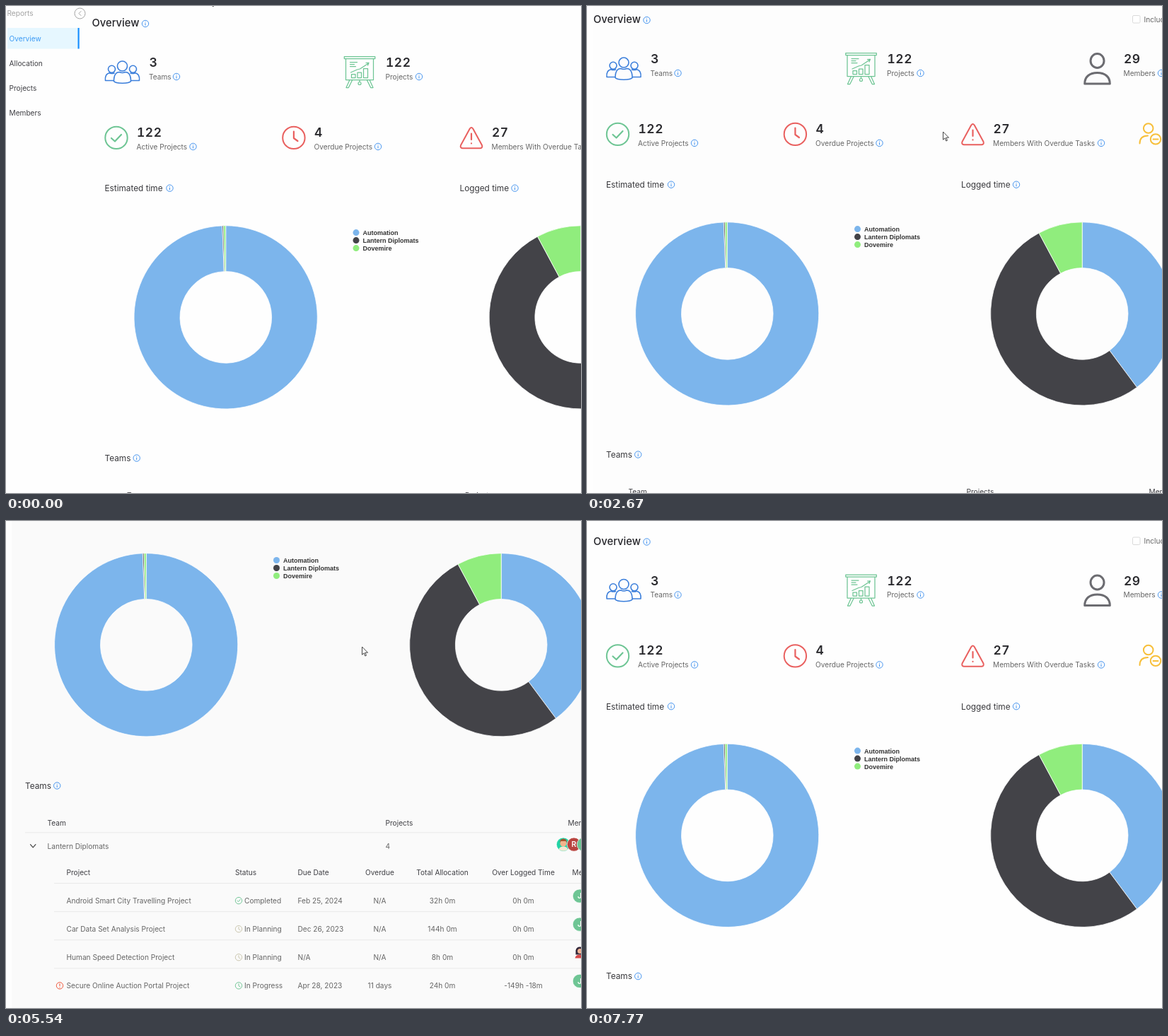
Recreate the animation shown at these times as an HTML page. Size 813 px wide and 689 px high, loop 8000 ms.

```html
<!DOCTYPE html>
<html lang="en">
<head>
<meta charset="utf-8">
<title>Reports overview</title>
<style>
  html, body { margin: 0; width: 100%; height: 100%; overflow: hidden; background: #fefefe; }
  svg { display: block; width: 813px; height: 689px; }
  text { font: 10.15px Inter, sans-serif; fill: #666; }
  .title { font-size: 14.75px; font-weight: 500; fill: #26262b; }
  .head { font-size: 11.8px; fill: #38383c; }
  .num { font-size: 17.4px; font-weight: 600; letter-spacing: .6px; font-variant-numeric: tabular-nums; fill: #2a2a2e; }
  .th { fill: #3f3f44; }
  .mid { text-anchor: middle; }
  .key { font: bold 9px "Liberation Sans", Arial, sans-serif; fill: #333; }
  .muted { fill: #a3a3a3; }
  .on { fill: #3d9bf5; }
  .initial { font-size: 10.5px; font-weight: 600; fill: #fff; text-anchor: middle; }
  .line { fill: none; stroke-linecap: round; stroke-linejoin: round; }
</style>
</head>
<body>
<svg id="stage" viewBox="0 0 813 689">
  <g id="page">
    <rect id="back" x="8" y="-800" width="1000" height="2400"/>
    <g id="side" transform="translate(-112.5 -5)"></g>
    <g id="main"></g>
    <g id="table" transform="translate(0 260.7)"></g>
  </g>
  <path id="cursor" d="M0 0V11.2L2.6 8.8 4.3 13 6 12.2 4.2 8.2H8Z" fill="#fff" stroke="#333" stroke-width=".9"/>
</svg>
<script>
const $ = id => document.getElementById(id);
const BLUE = '#7cb5ec', DARK = '#434348', LIME = '#90ed7d';
const GREEN = '#6ec594', RED = '#e9605f', LINK = '#3d8fee', SAND = '#c8c3aa';
const AZURE = '#3c7fdb', GREY = '#6c6c71', AMBER = '#f7bf3a';

const text = (x, y, s, cls = '') => `<text x="${x}" y="${y}" class="${cls}">${s}</text>`;
const line = (d, color, w) => `<path class="line" d="${d}" stroke="${color}" stroke-width="${w}"/>`;
const disc = (x, y, r, fill) => `<circle cx="${x}" cy="${y}" r="${r}" fill="${fill}"/>`;
const ring = (x, y, r, color, w) =>
  `<circle cx="${x}" cy="${y}" r="${r}" fill="none" stroke="${color}" stroke-width="${w}"/>`;
const rule = (x, y) => `<path d="M${x} ${y}H900" stroke="#e9e9e9"/>`;

const info = (x, y) => ring(x, y, 4.7, LINK, .95) +
  line(`M${x} ${y - .4}v2.6M${x} ${y - 2.3}v.1`, LINK, 1);
const stat = (x, y, num, label, infoX) =>
  text(x + .5, y, num, 'num') + text(x, y + 17.7, label) + info(infoX, y + 14);
const check = (x, y) => ring(x, y, 4.7, GREEN, .95) + line(`M${x - 2} ${y}l1.5 1.6 2.7-3.2`, GREEN, .95);
const clock = (x, y, color) => ring(x, y, 4.7, color, .95) + line(`M${x} ${y - 2.6}v2.9l2 1.2`, color, .95);

const OUTER = 129.6, INNER = 64.8;
function slice(cx, cy, a, b, fill) {
  const at = (r, f) => {
    const q = f * 2 * Math.PI;
    return `${(cx + r * Math.sin(q)).toFixed(2)} ${(cy - r * Math.cos(q)).toFixed(2)}`;
  };
  const big = b - a > .5 ? 1 : 0;
  return `<path d="M${at(OUTER, a)}A${OUTER} ${OUTER} 0 ${big} 1 ${at(OUTER, b)}L${at(INNER, b)}` +
    `A${INNER} ${INNER} 0 ${big} 0 ${at(INNER, a)}Z" fill="${fill}" stroke="#fff" stroke-width=".75"/>`;
}
const donut = (cx, a, b) => slice(cx, 435.4, 0, a, BLUE) +
  slice(cx, 435.4, a, b, DARK) + slice(cx, 435.4, b, 1, LIME);

function badge(x, y, color, letter = '') {
  return `<circle cx="${x}" cy="${y}" r="9.7" fill="${color}" stroke="#fff" stroke-width=".7"/>` +
    text(x, y + 3.8, letter, 'initial');
}

$('side').innerHTML =
  text(1.5, 14, 'Reports', 'muted') +
  ring(104.5, 10.5, 7.5, '#a3a3a3', 1) + line('M106 7.5l-3 3 3 3', '#a3a3a3', 1) +
  '<path d="M2 31H103V60.5H2Z" fill="#e6f7ff"/><path d="M101.5 31h2.2v29.5h-2.2Z" fill="#1890ff"/>' +
  text(4.5, 49.8, 'Overview', 'on') +
  ['Allocation', 'Projects', 'Members'].map((s, i) => text(4.5, 84.7 + 35 * i, s, 'th')).join('');

const teamIcon = ring(52, 80, 7, AZURE, 1.6) + ring(37, 84.3, 5, AZURE, 1.6) + ring(67, 84.3, 5, AZURE, 1.6) +
  line('M40 101.5c0-9 3.5-13 8-13q4 2 8 0c4.5 0 8 4 8 13q-2 2.7-12 2.7t-12-2.7Z' +
    'M39.5 100.5H28c-.8-6 1.5-10.3 6-10.8q3 1.5 6.5.3M64.5 100.5H76c.8-6-1.5-10.3-6-10.8q-3 1.5-6.5.3', AZURE, 1.6);
const boardIcon = line('M365.8 66.5h43.5v3h-43.5ZM368 69.5V99.5h39V69.5M373.5 99.5l-5 11h3.3l5.5-11M401.5 99.5l5 11h-3.3l-5.5-11' +
  'M387.5 99.5v3M374 74.5h10M374 77.5h6M374 80.5h8M375 89l9-4 4-1 12-8M396.5 75.5l4-.2-1.5 3.7' +
  'M376 91.5h5.5v5h-5.5ZM384.5 89h5.5v7.5h-5.5ZM393 83.5h6v13h-6Z', GREEN, 1.25) + ring(387.5, 104.5, 2, GREEN, 1.2);
const memberIcon = `<ellipse cx="721.5" cy="77.5" rx="9.5" ry="10" fill="none" stroke="${GREY}" stroke-width="3"/>` +
  line('M703.7 110c0-10 7-15.5 17.8-15.5s17.8 5.5 17.8 15.5Z', GREY, 3);
const alertIcon = line('M543.3 168.5q2.2-3 4.4 0L560.5 192q1.2 3.8-2.5 4.3H533q-3.7-.5-2.5-4.3Z', RED, 2) +
  line('M545.5 175.5v8.5M545.5 189.3v.1', RED, 2.2);
const idleIcon = ring(793.7, 173, 6.8, AMBER, 2) + ring(804, 188.4, 7.2, AMBER, 2) +
  line('M781.5 194.5c0-7 4-11 11.5-11M800.5 188.4h7', AMBER, 2);

$('main').innerHTML =
  text(9, 24, 'Overview', 'title') + info(84.5, 20) +
  '<rect x="771.5" y="13.5" width="10.5" height="10.5" rx="1.5" fill="#fff" stroke="#d6d6d6" stroke-width=".9"/>' +
  text(787.5, 22.7, 'Include Archived Projects') +
  teamIcon + boardIcon + memberIcon +
  stat(89.5, 81, 3, 'Teams', 128.5) + stat(424, 81, 122, 'Projects', 471.5) + stat(758.5, 81, 29, 'Members', 812) +
  ring(43.5, 181.4, 15.7, GREEN, 2) + line('M36.5 182l5 4.5 9-9.5', GREEN, 2.2) +
  ring(294.4, 181.4, 15.7, RED, 2) + line('M294.4 172.5v9.5l5.5 4', RED, 2.2) +
  alertIcon + idleIcon +
  stat(72, 179.9, 122, 'Active Projects', 152) + stat(323, 179.9, 4, 'Overdue Projects', 413.5) +
  stat(574, 179.9, 27, 'Members With Overdue Tasks', 727) +
  text(27, 257, 'Estimated time', 'head') + info(119, 252.7) +
  text(529, 257, 'Logged time', 'head') + info(607, 252.7) +
  donut(198.2, .994, .9963) + donut(700.2, .3983, .9218) +
  [['Automation', BLUE], ['Lantern Diplomats', DARK], ['Dovemire', LIME]].map(([s, c], i) =>
    disc(382.5, 315.6 + 11 * i, 4.5, c) + text(392, 319 + 11 * i, s, 'key')).join('') +
  text(27, 638.7, 'Teams', 'head') + info(72.2, 634.6);

const rows = [
  ['Android Smart City Travelling Project', 'Completed', 'Feb 25, 2024', 'N/A', '32h 0m', '0h 0m'],
  ['Car Data Set Analysis Project', 'In Planning', 'Dec 26, 2023', 'N/A', '144h 0m', '0h 0m'],
  ['Human Speed Detection Project', 'In Planning', 'N/A', 'N/A', '8h 0m', '0h 0m'],
  ['Secure Online Auction Portal Project', 'In Progress', 'Apr 28, 2023', '11 days', '24h 0m', '-149h -18m']
];
const cells = (r, y, cls, statusX) => [85.5, statusX, 412.5, 528.5, 617, 731.5]
  .map((x, i) => text(x, y, r[i], cls + (i > 2 ? ' mid' : ''))).join('');
const statusIcon = {
  'Completed': check,
  'In Planning': (x, y) => clock(x, y, SAND),
  'In Progress': (x, y) => clock(x, y, GREEN)
};

$('table').innerHTML =
  text(58.5, 430, 'Team', 'th') + text(536.5, 430, 'Projects', 'th') + text(794.5, 430, 'Members', 'th') +
  rule(27, 440.3) + line('M34.5 457l3.7 4.2 3.7-4.2', '#444', 1.2) +
  text(58.5, 463, 'Lantern Diplomats') + text(536.5, 463, '4') +
  badge(788, 457, '#22d3a5') + disc(788, 455.5, 4.6, '#f3b48c') +
  '<path d="M783 455q0-6 5-6t5 6l-1.5-2.5h-7Z" fill="#a8532d"/><path d="M781.5 464q1.5-4 6.5-4t6.5 4q-6.5 4.5-13 0" fill="#f6e7d2"/>' +
  badge(803, 457, '#b8443f', 'R') + badge(817, 457, GREEN) +
  cells(['Project', 'Status', 'Due Date', 'Overdue', 'Total Allocation', 'Over Logged Time'], 500, 'th', 324) +
  text(800.5, 500, 'Members', 'th') +
  rows.map((r, i) => {
    const y = 536.5 + 40.1 * i;
    return rule(68, y - 24.5) + statusIcon[r[1]](329, y) + cells(r, y + 3.7, '', 337) +
      (i === 2 ? '' : badge(811, y - 6.5, GREEN, 'J'));
  }).join('') +
  '<path d="M805.5 613v-6q1-5 6-5t6 5v6Z" fill="#33283a"/>' + disc(811.5, 608, 3.5, '#f0b394') +
  '<path d="M804.5 618q1-5 7-5t7 5Z" fill="#d84a4a"/>' +
  ring(76, 656.8, 4.7, '#f0583c', 1) + line('M76 654.3v2.7M76 659.2v.1', '#f0583c', 1.1);

// Motion
const clamp = v => Math.min(1, Math.max(0, v));
const sine = p => (1 - Math.cos(Math.PI * clamp(p))) / 2;
const steps = (t, from, step) => Math.floor((t - from) / step + .001);
const TOP = 9.5, BOTTOM = -260.7;

function pan(t) {
  const p = t < 30 ? 0 : clamp((steps(t, 30, 64.5) + 1) / 12);
  return [112.5 * (1 - p) ** 1.95, 5 + 4.5 * p ** 2.8];
}

// Share of the way scrolled down
function scrolled(t) {
  if (t < 2670) return 0;
  if (t < 5540) {
    const k = t < 2700 ? 0 : 1 + steps(t, 2700, 61.66);
    return sine(.12 + .88 * k / 7);
  }
  const u = t < 5830 ? 5540 + 72.5 * steps(t, 5540, 72.5) : 5830 + 60 * steps(t, 5830, 60);
  return 1 - sine((u - 5522) / 608);
}

const pointer = [
  [0, 288, -12.3], [740, 262, -12.3], [1050, 262, -12.3], [1410, 503.5, 178], [6540, 503.5, 178],
  [7200, 172, 38], [7320, 220, 41], [7770, 12, -15], [8000, 12, -15]
];
function pointerAt(t) {
  const i = pointer.findIndex(k => k[0] > t);
  const [t0, x0, y0] = pointer[i - 1], [t1, x1, y1] = pointer[i];
  const p = sine((t - t0) / (t1 - t0));
  return [x0 + (x1 - x0) * p, y0 + (y1 - y0) * p];
}

function draw(t) {
  const [x, y] = pan(t), s = scrolled(t);
  const shade = Math.round(253.5 - 3.5 * s);
  $('page').setAttribute('transform', `translate(${x} ${y + (BOTTOM - TOP) * s})`);
  $('back').setAttribute('fill', `rgb(${shade},${shade},${shade})`);
  $('cursor').setAttribute('transform', `translate(${pointerAt(t)})`);
}

let start;
function tick(now) {
  start ??= now;
  draw((now - start) % 8000);
  requestAnimationFrame(tick);
}
draw(0);
requestAnimationFrame(tick);
</script>
</body>
</html>
```
